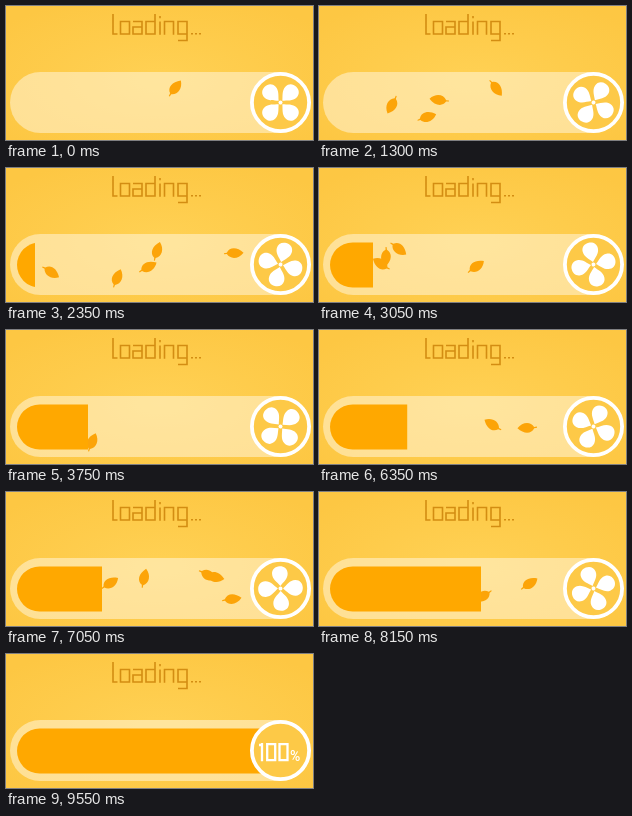
These frames come from a looping animation (307x134 px, 9650 ms). An HTML page:

```html
<!DOCTYPE html>
<html lang="en">
<head>
<meta charset="utf-8">
<title>loading</title>
<style>
html, body { margin: 0; width: 100%; height: 100%; overflow: hidden; background: #fdc945; }
svg { display: block; width: 307px; height: 134px; }
.lettering { fill: none; stroke: #d38d12; stroke-width: 1.6; }
.leaf { fill: #fca408; }
.digits { fill: none; stroke: #fff; stroke-width: 2.3; }
.percent { fill: #fff; font: 500 14px Roboto, sans-serif; }
</style>
</head>
<body>
<svg viewBox="0 0 307 134" role="img" aria-label="loading...">
  <defs>
    <radialGradient id="glow" cx=".5" cy=".55" r=".65">
      <stop offset="0" stop-color="#ffd154"/>
      <stop offset="1" stop-color="#fdc743"/>
    </radialGradient>
    <clipPath id="done"><rect id="level" y="70" width="0" height="56"/></clipPath>
    <path id="leafShape" d="M-10 1.2L-7.2 .3C-5-5.8 2.5-6.6 9.5-1.2C5 5.8-3 6.8-7 1.7L-9.7 2.2Z"/>
    <path id="petal" d="M0-2.6C-3.2-6.5-7.8-9.5-7.8-15C-7.8-19.6-4.3-22.3 0-22.3S7.8-19.6 7.8-15C7.8-9.5 3.2-6.5 0-2.6Z"/>
  </defs>

  <rect width="307" height="134" fill="url(#glow)"/>

  <path class="lettering" d="M107 8V28H111.5 M114.5 15.5h9v12.5h-9z
    M127 15.5h9v12.5h-9v-7h9 M149 8v20h-9v-12.5h9 M154 15.5V28.8 M154 10v2.2
    M158.5 28.8V15.5h9v13.3 M181 28h-9v-12.5h9V34.5h-9
    M185 27.8h2 M189 27.8h2 M193 27.8h2"/>

  <rect x="4" y="66" width="300" height="61" rx="30.5" fill="#fffaf0" fill-opacity=".47"/>
  <g id="leaves"></g>
  <rect x="11" y="74.5" width="290" height="45" rx="22.5" fill="#ffa800" clip-path="url(#done)"/>

  <g transform="translate(274.5 96.5)">
    <circle r="28.6" fill="#fdc947" stroke="#fff" stroke-width="3.8"/>
    <g id="fan" fill="#fff">
      <circle r="2"/>
      <use href="#petal"/>
      <use href="#petal" transform="rotate(90)"/>
      <use href="#petal" transform="rotate(180)"/>
      <use href="#petal" transform="rotate(270)"/>
    </g>
    <g id="total">
      <path class="digits" d="M-21.5-5.5H-18.5V10.8 M-18.5-7.5V0 M-13.3-6.4h8v16h-8z M-1-6.4h8v16h-8z"/>
      <text class="percent" x="9.5" y="10.6">%</text>
    </g>
  </g>
</svg>
<script>
const LOOP = 9650;
const $ = id => document.getElementById(id);
const level = $("level"), fan = $("fan"), total = $("total");

// [time, right edge of the bar]
const edges = [[2000, 11], [2150, 17], [2350, 29], [3050, 54], [3750, 82], [5150, 82],
  [5450, 84], [6150, 86], [7050, 96], [8100, 158], [9150, 243], [9550, 262]];

// Each leaf drifts through [time, x, y, angle] and keeps its last motion
const paths = [
  [[0, 169, 82, -45], [1300, 73, 99, 125]],
  [[50, 258, 88, 0], [1300, 120, 94, 195], [2350, 45, 104, 400]],
  [[50, 262, 100, -190], [1300, 108, 111, -10]],
  [[300, 258, 100, -120], [1300, 177, 82, 60], [2350, 111, 110, 300]],
  [[1300, 258, 80, 130], [2350, 151, 83, 295]],
  [[1300, 262, 95, 160], [2350, 142, 99, -20]],
  [[2050, 258, 100, -50], [2350, 228, 85, 5], [3750, 86, 112, -60]],
  [[4000, 258, 85, 100], [5450, 111, 111, 295]],
  [[5500, 258, 100, 80], [7050, 104, 91, 335]],
  [[5850, 258, 105, 110], [7050, 138, 86, 290]],
  [[6500, 258, 100, -45], [7050, 202, 83, 35]],
  [[6550, 258, 95, -60], [7050, 209, 85, 20]],
  [[6750, 258, 90, -45], [7050, 226, 107, 0]],
  [[7150, 258, 85, 0], [8300, 150, 105, 180]],
  [[7600, 258, 105, 60], [8500, 180, 85, -80]]
];

const leaves = paths.map(path => {
  const node = document.createElementNS("http://www.w3.org/2000/svg", "use");
  node.setAttribute("href", "#leafShape");
  node.setAttribute("class", "leaf");
  $("leaves").append(node);
  return { path, node };
});

const mix = (a, b, u) => a + (b - a) * u;
const clamp = u => Math.min(1, Math.max(0, u));

function segment(keys, t) {
  let i = 0;
  while (i < keys.length - 2 && t >= keys[i + 1][0]) i++;
  const a = keys[i], b = keys[i + 1];
  return [a, b, (t - a[0]) / (b[0] - a[0])];
}

function edgeAt(t) {
  const [a, b, u] = segment(edges, t);
  return mix(a[1], b[1], clamp(u));
}

function drawLeaf({ path, node }, t, edge) {
  const [a, b, u] = segment(path, t);
  const x = mix(a[1], b[1], u);
  const y = mix(a[2], b[2], (1 - Math.cos(Math.PI * u)) / 2);
  const shown = t >= path[0][0] && x > Math.max(17, edge - 8);
  node.style.display = shown ? "" : "none";
  if (shown) node.setAttribute("transform", `translate(${x} ${y}) rotate(${mix(a[3], b[3], u)})`);
}

function draw(now) {
  // Ten poses a second, with one short step early on
  const time = now % LOOP;
  const shift = time < 1550 ? 0 : 50;
  const step = Math.floor((time + shift) / 100);
  const t = step * 100 - shift;
  const edge = edgeAt(t);
  const swap = clamp((t - 9050) / 500);

  level.setAttribute("width", edge);
  leaves.forEach(leaf => drawLeaf(leaf, t, edge));
  fan.setAttribute("transform", `rotate(${45 - 42.5 * step}) scale(${1 - swap})`);
  total.setAttribute("transform", `scale(${swap})`);
}

const start = performance.now();
function tick() {
  draw(performance.now() - start);
  requestAnimationFrame(tick);
}
tick();
</script>
</body>
</html>
```
